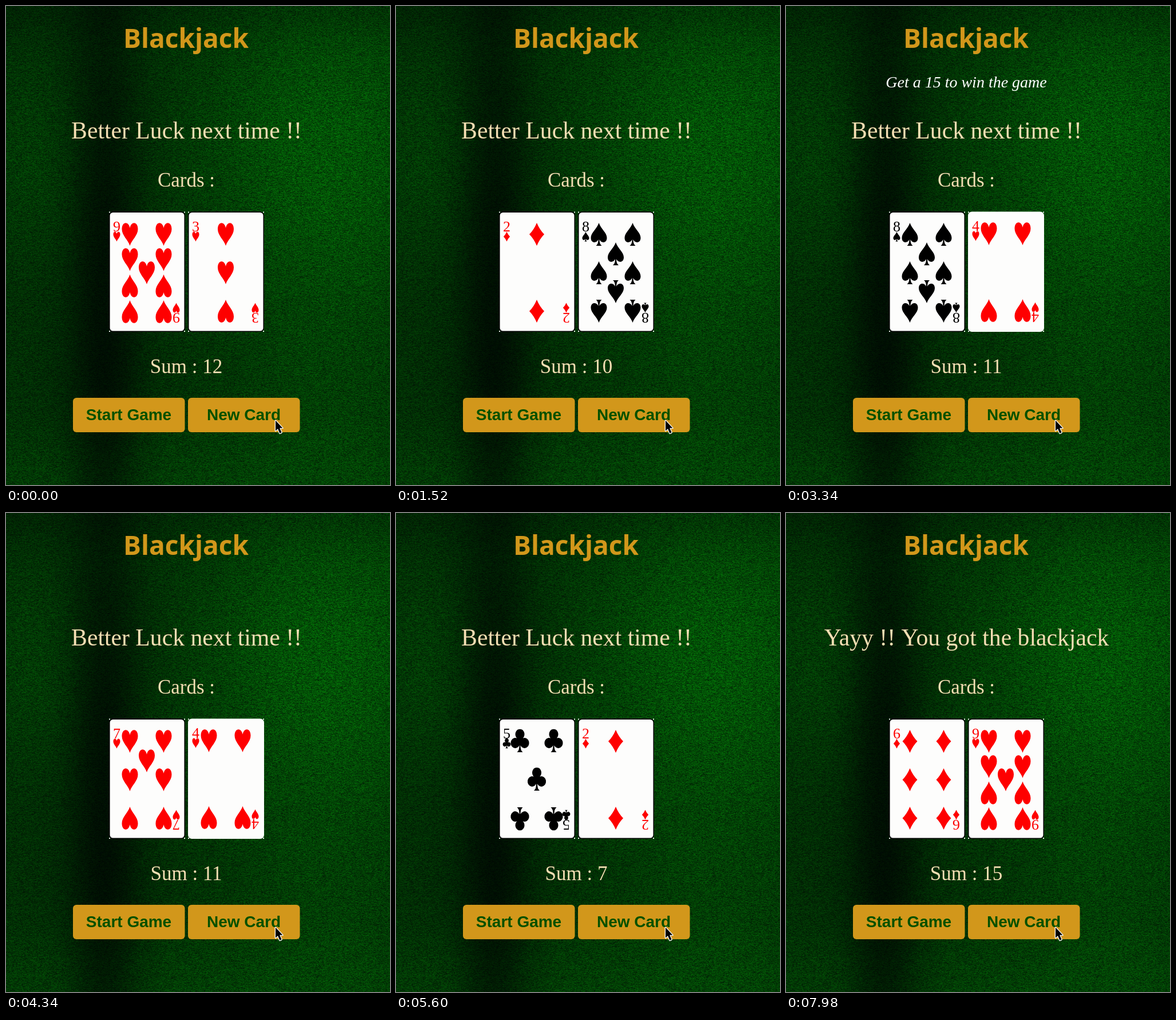
An HTML page with a canvas that plays this animation: 671 by 835 pixels, repeating every 8 s.

```html
<!DOCTYPE html>
<html lang="en">
<head>
<meta charset="utf-8">
<title>Blackjack</title>
<style>
  html, body { margin: 0; width: 100%; height: 100%; overflow: hidden; background: #002a04; }
  canvas { display: block; }
</style>
</head>
<body>
<canvas id="stage" width="671" height="835"></canvas>
<script>
const W = 671, H = 835, LOOP = 8000;
const ctx = document.getElementById('stage').getContext('2d');
const SERIF = '"Liberation Serif", serif';
const CREAM = '#f5deb3', GOLD = '#d2971b', DARK_GREEN = '#005000', RED = '#fe0000';
const LOSE = 'Better Luck next time !!', WIN = 'Yayy !! You got the blackjack';

// Each hand: start time, two cards, sum, message
const hands = [
  [0, '9h', '3h', 12, LOSE],
  [420, '2d', '8s', 10, LOSE],
  [2100, '8s', '4h', 12, LOSE],
  [3330, '8s', '4h', 11, LOSE], // the first card's picture arrives late
  [3370, '7h', '4h', 11, LOSE],
  [4900, '5c', '2d', 7, LOSE],
  [6250, '6d', '9h', 15, WIN]
];

// Pip positions inside a card
const L = 36.5, M = 66, R = 95.5;
const pair = y => [[L, y], [R, y]];
const ends = [...pair(40), ...pair(174)];
const layouts = {
  2: [[M, 40], [M, 174]],
  3: [[M, 40], [M, 107], [M, 174]],
  4: ends,
  5: [...ends, [M, 107]],
  6: [...ends, ...pair(107)],
  7: [...ends, ...pair(107), [M, 74]],
  8: [...ends, ...pair(107), [M, 74], [M, 140]],
  9: [...pair(40), ...pair(84), ...pair(130), ...pair(175), [M, 107]]
};

// Suit outlines, centred on the origin, about 28 by 40
const suits = {
  h: new Path2D('M0 20C-3 10-14 2-14-9C-14-23-2-23 0-11C2-23 14-23 14-9C14 2 3 10 0 20Z'),
  d: new Path2D('M0-20Q5-8 13 0Q5 8 0 20Q-5 8-13 0Q-5-8 0-20Z'),
  s: new Path2D('M0-20C3-10 14-3 14 6C14 16 4 16 1 9Q1 17 5 20H-5Q-1 17-1 9C-4 16-14 16-14 6C-14-3-3-10 0-20Z'),
  c: new Path2D('M-3-4A8 9 0 1 1 3-4A8 9 0 1 1 1 7Q1 16 5 19H-5Q-1 16-1 7A8 9 0 1 1-3-4Z')
};

function text(str, x, y, font, color) {
  ctx.font = font;
  ctx.fillStyle = color;
  ctx.textAlign = 'center';
  ctx.fillText(str, x, y);
}

function roundRect(x, y, w, h, r) {
  ctx.beginPath();
  ctx.roundRect(x, y, w, h, r);
}

function pip(suit, x, y, scale, flipped) {
  ctx.save();
  ctx.translate(x, y);
  ctx.scale(scale, flipped ? -scale : scale);
  ctx.fill(suits[suit]);
  ctx.restore();
}

function drawCorner(rank, suit, color) {
  text(rank, 13.5, 35, '26px ' + SERIF, color);
  pip(suit, 13.5, 44, 0.43);
}

function drawCard(name, x) {
  const [rank, suit] = name;
  const color = 'hd'.includes(suit) ? RED : '#000';
  const borderless = rank === '4';
  ctx.save();
  ctx.translate(x, 358.5);
  ctx.fillStyle = '#e8eee8';
  for (const cx of [0, 131]) for (const cy of [0, 207.5]) ctx.fillRect(cx, cy, 2, 2);
  roundRect(0.8, 0.8, 131.4, 207.9, 6);
  ctx.fillStyle = '#fdfdfc';
  ctx.fill();
  ctx.strokeStyle = borderless ? '#fdfdfc' : '#000';
  ctx.lineWidth = 1.5;
  ctx.stroke();

  ctx.translate(0, borderless ? -1.5 : -0.5);
  ctx.fillStyle = color;
  for (const [px, py] of layouts[rank]) pip(suit, px, py, 1, suit !== 'd' && py > 120);
  drawCorner(rank, suit, color);
  ctx.translate(131, 212);
  ctx.rotate(Math.PI);
  drawCorner(rank, suit, color);
  ctx.restore();
}

function drawButton(label, x) {
  roundRect(x, 683, 195.5, 60, 6);
  ctx.fillStyle = GOLD;
  ctx.fill();
  text(label, x + 97.5, 722, 'bold 28px "Liberation Sans", sans-serif', DARK_GREEN);
}

const pointer = new Path2D('M471 722.5V740.5L475 737L478.4 745L481.6 743.6L478.2 735.8H483.4Z');
function drawPointer() {
  ctx.lineJoin = 'round';
  ctx.lineWidth = 2.5;
  ctx.strokeStyle = '#fff';
  ctx.stroke(pointer);
  ctx.fillStyle = '#000';
  ctx.fill(pointer);
}

// Grainy green felt with soft light and dark areas
function makeFelt() {
  const felt = document.createElement('canvas');
  felt.width = W;
  felt.height = H;
  const fctx = felt.getContext('2d');
  const image = fctx.createImageData(W, H);
  const glow = (x, y, cx, cy, rx, ry) => Math.exp(-(((x - cx) / rx) ** 2) - ((y - cy) / ry) ** 2);
  let seed = 7, last = 0.5;
  const random = () => (seed = (Math.imul(seed, 1664525) + 1013904223) >>> 0) / 2 ** 32;
  for (let y = 0, i = 0; y < H; y++) {
    for (let x = 0; x < W; x++, i += 4) {
      const shade = 30 * Math.exp(-(((x - 172) / 65) ** 2)) * (0.5 + 0.5 * Math.min(1, y / 350));
      const level = 44 - shade
        + 38 * glow(x, y, 560, 260, 220, 300)
        + 14 * glow(x, y, 50, 270, 90, 170)
        + 11 * glow(x, y, 560, 700, 160, 200)
        + 15 * glow(x, y, 335, 840, 700, 110)
        - 8 * Math.exp(-((y / 50) ** 2));
      last = last * 0.35 + random() * 0.65;
      const green = level * (0.4 + 1.2 * last);
      image.data[i] = green * 0.03;
      image.data[i + 1] = green;
      image.data[i + 2] = green * 0.05 + random() * 4;
      image.data[i + 3] = 255;
    }
  }
  fctx.putImageData(image, 0, 0);
  return felt;
}
const felt = makeFelt();

function draw(t) {
  const [, first, second, sum, message] = hands.findLast(hand => t >= hand[0]);
  const blink = t % 2000;
  ctx.drawImage(felt, 0, 0);
  text('Blackjack', 314.5, 73, 'bold 46px "Open Sans", sans-serif', GOLD);
  if (blink >= 430 && blink < 1430) {
    text('Get a 15 to win the game', 315, 142, 'italic 28px ' + SERIF, '#fff');
  }
  text(message, 315.5, 231, '41.7px ' + SERIF, CREAM);
  text('Cards :', 315, 315, '35px ' + SERIF, CREAM);
  drawCard(first, 180);
  drawCard(second, 318);
  text('Sum : ' + sum, 315, 640, '35px ' + SERIF, CREAM);
  drawButton('Start Game', 117);
  drawButton('New Card', 318);
  drawPointer();
}

const start = performance.now();
function tick() {
  draw((performance.now() - start) % LOOP);
  requestAnimationFrame(tick);
}
tick();
</script>
</body>
</html>
```
